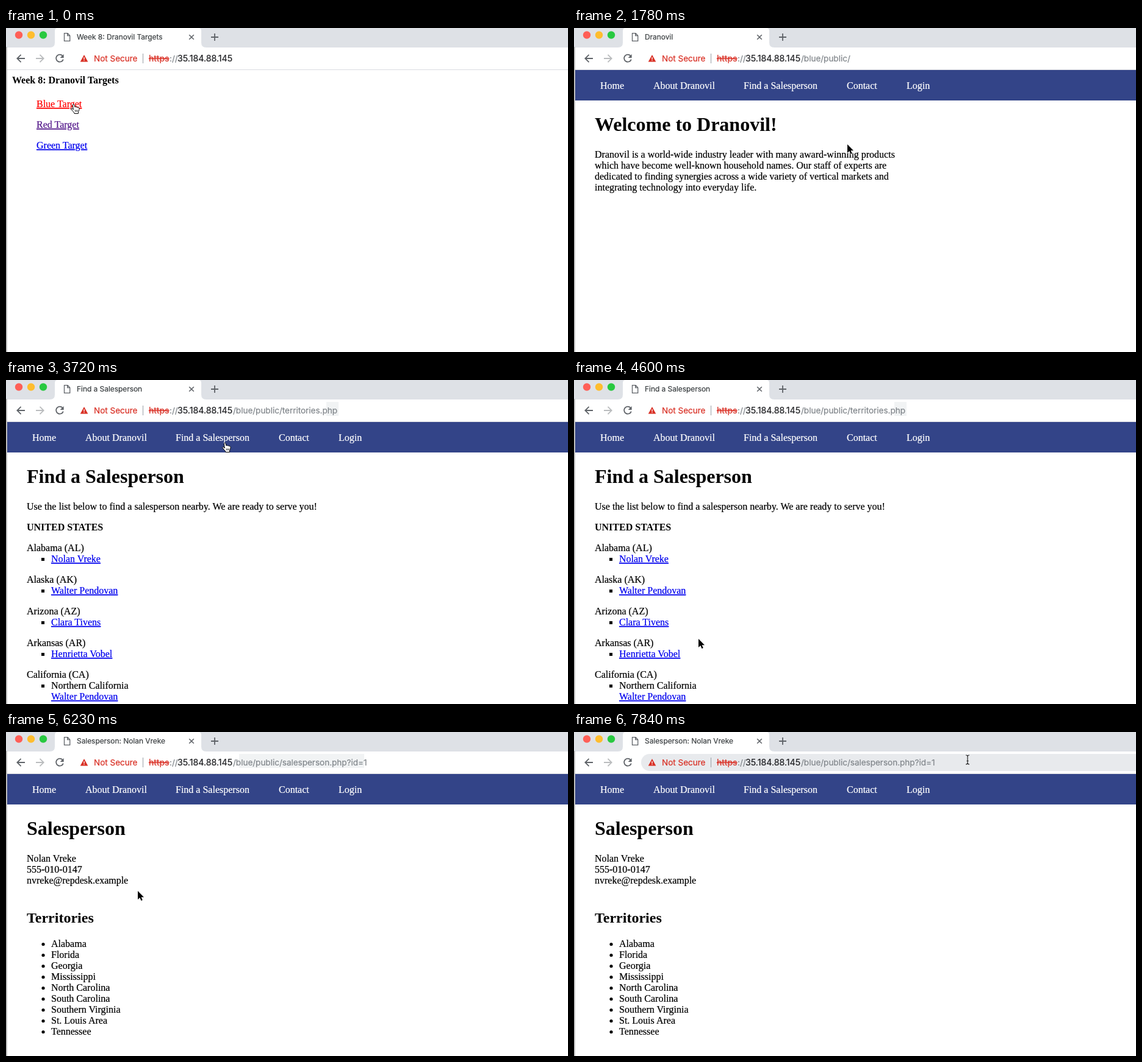
An HTML page for the animation above (7990 ms loop, 921x532 px).

```html
<!DOCTYPE html>
<html lang="en">
<head>
<meta charset="utf-8">
<title>Browser walkthrough</title>
<style>
html, body { margin: 0; width: 100%; height: 100%; overflow: hidden; background: #fff; }
svg { display: block; }
text { white-space: pre; fill: currentColor; stroke: currentColor; stroke-width: .22px; }
.ui { font-family: Inter, Roboto, sans-serif; font-size: 13.5px; }
.page { font-family: "Liberation Serif", "Times New Roman", serif; font-size: 16px; color: #000; }
.b { font-weight: 700; }
.h1 { font-weight: 700; font-size: 32px; }
.h2 { font-weight: 700; font-size: 24px; }
.b, .h1, .h2 { stroke: none; }
.link { color: #00e; text-decoration: underline; }
.line { fill: none; stroke: #5f6368; stroke-width: 1.8; }
</style>
</head>
<body>
<svg width="921" height="532" viewBox="0 0 921 532">
  <rect width="921" height="532" fill="#fff"/>
  <rect width="921" height="32" fill="#dee1e6"/>
  <path d="M72 32Q80 32 80 24V5Q80 1 83 0H317Q320 1 320 5V24Q320 32 328 32Z" fill="#fff"/>
  <circle cx="21" cy="11.5" r="6.2" fill="#ff5f57"/>
  <circle cx="41" cy="11.5" r="6.2" fill="#ffbd2e"/>
  <circle cx="61" cy="11.5" r="6.2" fill="#28c940"/>
  <path id="doc" class="line" style="stroke-width:1.3" d="M95.5 8.7H101L104.7 12.4V21.3H95.5ZM100.7 9V12.7H104.5"/>
  <path id="spinner" class="line" style="stroke:#9aa0a6;stroke-width:1.5" d="M95.8 11.8A6 6 0 0 1 100.5 9"/>
  <path class="line" style="stroke-width:1.6" d="M300.2 11.2L307.8 18.8M307.8 11.2L300.2 18.8"/>
  <path class="line" d="M342 9V21M336 15H348"/>
  <rect id="pill" x="110" y="36" width="840" height="28" rx="14" fill="#e8eaed"/>
  <rect id="patch" y="36" height="23" fill="#f1f3f4"/>
  <path class="line" d="M31 50H18.5M24.5 43.8L18.3 50L24.5 56.2"/>
  <path class="line" style="stroke:#babcbe" d="M49 50H61.5M55.5 43.8L61.7 50L55.5 56.2"/>
  <g id="reload">
    <path class="line" d="M92.6 45.6A6 6 0 1 0 93.8 51.6"/>
    <path d="M94.6 43V49H88.6Z" fill="#5f6368"/>
  </g>
  <path id="stop" class="line" d="M82.5 44.5L93.5 55.5M93.5 44.5L82.5 55.5"/>
  <path d="M128 44L134.3 55.5H121.7Z" fill="#d93025"/>
  <path d="M128 48V51.7M128 52.7V54" stroke="#fff" stroke-width="1.3"/>
  <path d="M224.5 42V58" stroke="#9aa0a6"/>
  <g class="ui">
    <text id="title" x="116" y="19" style="font-size:11.9px" color="#3c4043"></text>
    <g color="#d93025">
      <text x="144" y="55">Not Secure</text>
      <text x="234" y="55" style="font-size:14px" text-decoration="line-through">https</text>
    </g>
    <text x="268" y="55" color="#80868b">://</text>
    <text x="281" y="55" style="font-size:14.2px" color="#202124">35.184.88.145</text>
    <text id="path" x="372" y="55" color="#80868b"></text>
  </g>
  <path d="M0 68.5H921" stroke="#dadce0"/>
  <g id="pages" class="page"></g>
  <path d="M.9 31V532" stroke="#b4b4b4" stroke-width="1.8"/>
  <g id="cursors">
    <g id="hand" stroke="#000" fill="#fff" stroke-linejoin="round">
      <path d="M4 8L3.4 3C3 .8 5.2 .4 5.8 2L7 6C7.6 5 9 5 9.4 6.2C10 5.4 11.4 5.6 11.7 6.8C12.5 6.2 14 6.8 14 8.2C14.2 10 13.4 12 12.6 13.5L12.3 16.5H6L5.6 15C4 13 2.5 11.5 1 9.6C.2 8.2 1.8 7.2 2.8 8.2L4.4 10Z"/>
      <path d="M7.2 10.5L7.6 13.5M9.2 10.5L9.4 13.5M11.2 10.5V13.5" stroke-width=".8"/>
    </g>
    <path id="arrow" d="M0 0V14L3.3 11L5.5 16L7.8 15L5.6 10.2H10Z" stroke="#fff" paint-order="stroke" stroke-width="1.6"/>
    <path id="beam" d="M1 0Q4 0 4 2Q4 0 7 0M4 2V13M1 15Q4 15 4 13Q4 15 7 15M2.5 9.5H5.5" fill="none" stroke="#222" stroke-width="1.2"/>
  </g>
</svg>
<script>
const $ = id => document.getElementById(id);
const LOOP = 7990;
const BRAND = 'Dranovil', SELLER = 'Nolan Vreke', WEST = 'Walter Pendovan';

const text = (x, y, words, cls = '', style = '') =>
  `<text x="${x}" y="${y}" class="${cls}" style="${style}">${words}</text>`;
const lines = (x, y, rows) => rows.map((row, i) => text(x, y + 18 * i, row)).join('');

const navItems = [[43, 'Home'], [130, 'About ' + BRAND], [278, 'Find a Salesperson'], [447, 'Contact'], [545, 'Login']];
const nav = '<rect x="2" y="69" width="919" height="50" fill="#348"/>' +
  navItems.map(([x, label]) => text(x, 100, label, '', 'color:#fff')).join('');
const square = y => `<rect x="58" y="${y - 7}" width="5" height="5"/>`;

const states = [['Alabama (AL)', SELLER], ['Alaska (AK)', WEST], ['Arizona (AZ)', 'Clara Tivens'], ['Arkansas (AR)', 'Henrietta Vobel']];
const areas = ['Alabama', 'Florida', 'Georgia', 'Mississippi', 'North Carolina', 'South Carolina', 'Southern Virginia', 'St. Louis Area', 'Tennessee'];

const pages = [
  { at: 0, title: `Week 8: ${BRAND} Targets`, path: '', body:
    text(10, 91, `Week 8: ${BRAND} Targets`, 'b') +
    text(50, 130, 'Blue Target', 'link', 'color:#f00') +
    text(50, 164, 'Red Target', 'link', 'color:#551a8b') +
    text(50, 198, 'Green Target', 'link') },
  { at: 600, title: BRAND, path: '/blue/public/', body: nav +
    text(34, 169, `Welcome to ${BRAND}!`, 'h1') +
    lines(34, 213, [
      BRAND + ' is a world-wide industry leader with many award-winning products',
      'which have become well-known household names. Our staff of experts are',
      'dedicated to finding synergies across a wide variety of vertical markets and',
      'integrating technology into everyday life.']) },
  { at: 3570, title: 'Find a Salesperson', path: '/blue/public/territories.php', patch: [525, 20], body: nav +
    text(34, 169, 'Find a Salesperson', 'h1') +
    text(34, 213, 'Use the list below to find a salesperson nearby. We are ready to serve you!') +
    text(34, 247, 'UNITED STATES', 'b') +
    states.map(([state, name], i) => {
      const y = 281 + 52 * i;
      return text(34, y, state) + square(y + 18) + text(74, y + 18, name, 'link');
    }).join('') +
    text(34, 489, 'California (CA)') + square(507) +
    text(74, 507, 'Northern California') + text(74, 525, WEST, 'link') },
  { at: 5790, title: 'Salesperson: ' + SELLER, path: '/blue/public/salesperson.php?id=1', patch: [382, 205], body: nav +
    text(34, 169, 'Salesperson', 'h1') +
    lines(34, 213, [SELLER, '555-010-0147', 'nvreke@repdesk.example']) +
    text(34, 313, 'Territories', 'h2') +
    lines(74, 353, areas) +
    areas.map((_, i) => `<circle cx="61" cy="${348.5 + 18 * i}" r="2.6"/>`).join('') }
];
const loads = [[150, 890], [3420, 3720], [5640, 5790]];

// Pointer: each row starts at a time; rows with steps follow a quadratic curve in held steps.
const pointer = [
  { at: 0, kind: 'hand', to: [106, 124] },
  { at: 1180, kind: 'arrow', steps: 7, via: [620, 320], to: [384, 132], ease: true },
  { at: 2980, kind: 'arrow', to: [361, 105] },
  { at: 3120, kind: 'hand', to: [354, 102] },
  { at: 4160, kind: 'arrow', steps: 7, via: [200, 630], to: [147, 295], ease: true },
  { at: 5200, kind: 'hand', to: [145, 291] },
  { at: 6230, kind: 'arrow', steps: 7, via: [400, 190], to: [574, 14] },
  { at: 7260, kind: 'arrow', steps: 5, via: [690, -5], to: [641, 38] }
];
const STEP = 144;
const HOVER = 7560;

const current = (rows, t) => rows.findLastIndex(row => row.at <= t);
const show = (id, on) => $(id).style.display = on ? '' : 'none';

$('pages').innerHTML = pages.map((page, i) => `<g id="page${i}">${page.body}</g>`).join('');

function place(t) {
  const i = current(pointer, t), move = pointer[i];
  if (!move.steps) return move.to;
  const from = pointer[i - 1].to;
  let k = Math.min(1, (Math.floor((t - move.at) / STEP) + 1) / move.steps);
  if (move.ease) k = k * k * (3 - 2 * k);
  return from.map((a, n) => (1 - k) ** 2 * a + 2 * k * (1 - k) * move.via[n] + k * k * move.to[n]);
}

function draw(t) {
  const n = current(pages, t), page = pages[n];
  pages.forEach((_, i) => show('page' + i, i === n));
  $('title').textContent = page.title;
  $('path').textContent = page.path;

  const load = loads.find(([start, end]) => t >= start && t < end);
  show('doc', !load);
  show('reload', !load);
  show('spinner', load);
  show('stop', load);
  if (load) {
    const turn = Math.floor((t - load[0]) / STEP) * 100;
    $('spinner').setAttribute('transform', `rotate(${turn} 100.5 15)`);
  }

  const hover = t >= HOVER;
  show('pill', hover);
  show('patch', page.patch && !hover);
  if (page.patch) {
    $('patch').setAttribute('x', page.patch[0]);
    $('patch').setAttribute('width', page.patch[1]);
  }

  const kind = hover ? 'beam' : pointer[current(pointer, t)].kind;
  ['hand', 'arrow', 'beam'].forEach(id => show(id, id === kind));
  const [x, y] = place(t).map(Math.round);
  $('cursors').setAttribute('transform', `translate(${x} ${y})`);
}

const start = performance.now();
function tick() {
  draw((performance.now() - start) % LOOP);
  requestAnimationFrame(tick);
}
tick();
</script>
</body>
</html>
```
